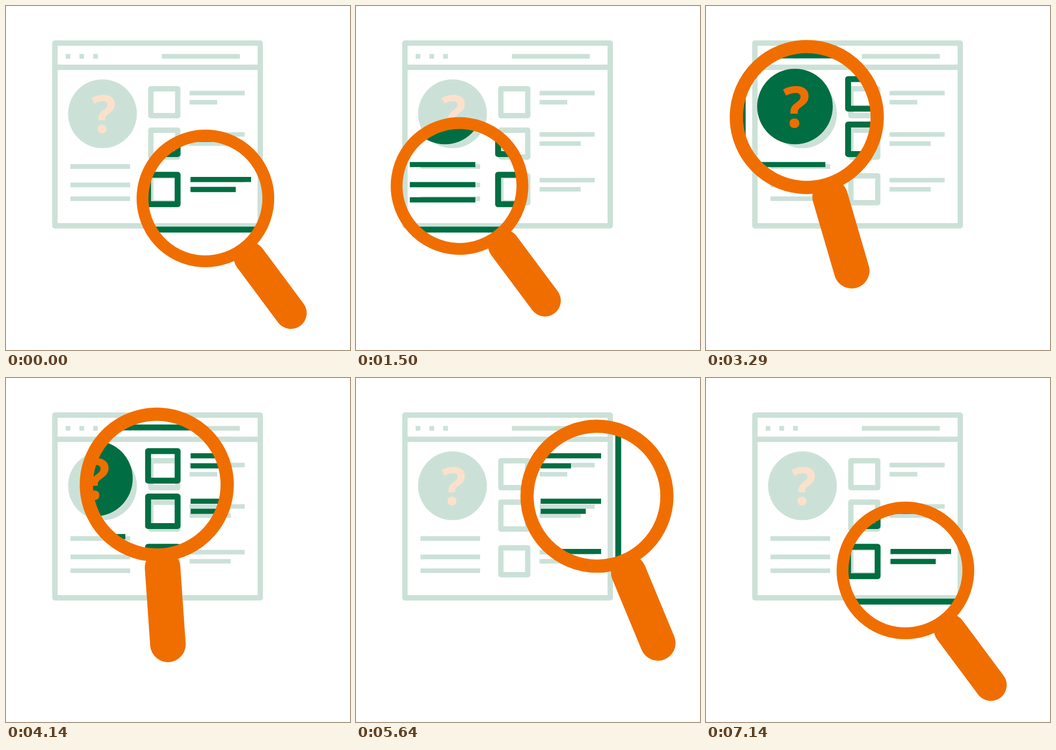
An HTML page that plays this animation: 640 by 640 pixels, repeating every 8 s.

```html
<!DOCTYPE html>
<html lang="en">
<head>
<meta charset="utf-8">
<title>Magnifier over a page</title>
<style>
html, body { margin: 0; width: 100%; height: 100%; overflow: hidden; background: #fff; }
svg { display: block; width: 100%; height: 100%; }
text { font: 700 96px "Open Sans", "Noto Sans", sans-serif; }
</style>
</head>
<body>
<svg viewBox="0 0 640 640">
  <defs>
    <g id="page" fill="none" stroke="#006e42" stroke-linejoin="round">
      <path id="boxes" stroke-width="10"/>
      <path id="lines" stroke-width="8.7"/>
      <circle cx="179.5" cy="200.5" r="64" fill="#006e42" stroke="none"/>
      <text x="182" y="236" text-anchor="middle" fill="#f06e00" stroke="none">?</text>
    </g>
    <clipPath id="lens"><circle id="hole" r="110"/></clipPath>
  </defs>
  <use href="#page" opacity=".2"/>
  <g clip-path="url(#lens)">
    <use href="#page" transform="translate(-31.7 -33.2) scale(1.0985)"/>
  </g>
  <g id="glass" fill="none" stroke="#f06e00">
    <circle r="117" stroke-width="22"/>
    <path d="M0 138V266" stroke-width="59" stroke-linecap="round"/>
  </g>
</svg>
<script>
const LOOP = 8000, FPS = 14;
const [boxes, lines, hole, glass] =
  ['boxes', 'lines', 'hole', 'glass'].map(id => document.getElementById(id));

const line = (x, y, w) => `M${x} ${y}h${w}`;
const box = (x, y, w, h) => `M${x} ${y}h${w}v${h}h${-w}z`;

function buildPage() {
  let frames = box(91, 69, 382, 340) + line(91, 114, 382);
  let bars = line(290, 93.7, 145);
  for (let i = 0; i < 3; i++) bars += line(111 + 25.6 * i, 93.7, 8.7);
  for (const y of [298.7, 332.8, 358.5]) bars += line(120, y, 111);
  for (const y of [179, 256, 341]) {
    frames += box(269.5, y - 25, 50, 50);
    bars += line(341.5, y - 17, 102.5) + line(341.5, y, y < 200 ? 51.5 : 76.5);
  }
  boxes.setAttribute('d', frames);
  lines.setAttribute('d', bars);
}

// Poses of the glass; bend bows the way to the next pose to the right
const poses = [
  { at: 0, x: 371, y: 358, tilt: 36.7, zoom: 1 },
  { at: 1020, x: 191.5, y: 320.5, tilt: 36.7, zoom: 1 },
  { at: 2080, x: 194, y: 354, tilt: 36.7, zoom: 1 },
  { at: 2570, x: 193, y: 276, tilt: 24.1, zoom: 1 },
  { at: 3290, x: 187.5, y: 206.5, tilt: 16.3, zoom: 1.12 },
  { at: 4270, x: 285, y: 198, tilt: 3.4, zoom: 1.12 },
  { at: 5270, x: 445, y: 204, tilt: 20.9, zoom: 1.125, bend: 132 }
];
poses.push({ ...poses[0], at: 7140 });

function draw(t) {
  const next = poses.findIndex(p => p.at > t);
  const b = poses.at(next), a = next < 0 ? b : poses[next - 1];
  const u = a === b ? 0 : (t - a.at) / (b.at - a.at);
  const e = u * u * (3 - 2 * u);
  const mix = key => a[key] + (b[key] - a[key]) * e;
  const x = mix('x') + (a.bend || 0) * e * (1 - e) ** 2;
  const place = `translate(${x} ${mix('y')}) scale(${mix('zoom')})`;
  hole.setAttribute('transform', place);
  glass.setAttribute('transform', `${place} rotate(${-mix('tilt')})`);
}

const start = performance.now();
function tick() {
  const t = (performance.now() - start) % LOOP;
  draw(Math.floor((t + 5) * FPS / 1000) * 1000 / FPS % LOOP);
  requestAnimationFrame(tick);
}

buildPage();
tick();
</script>
</body>
</html>
```
